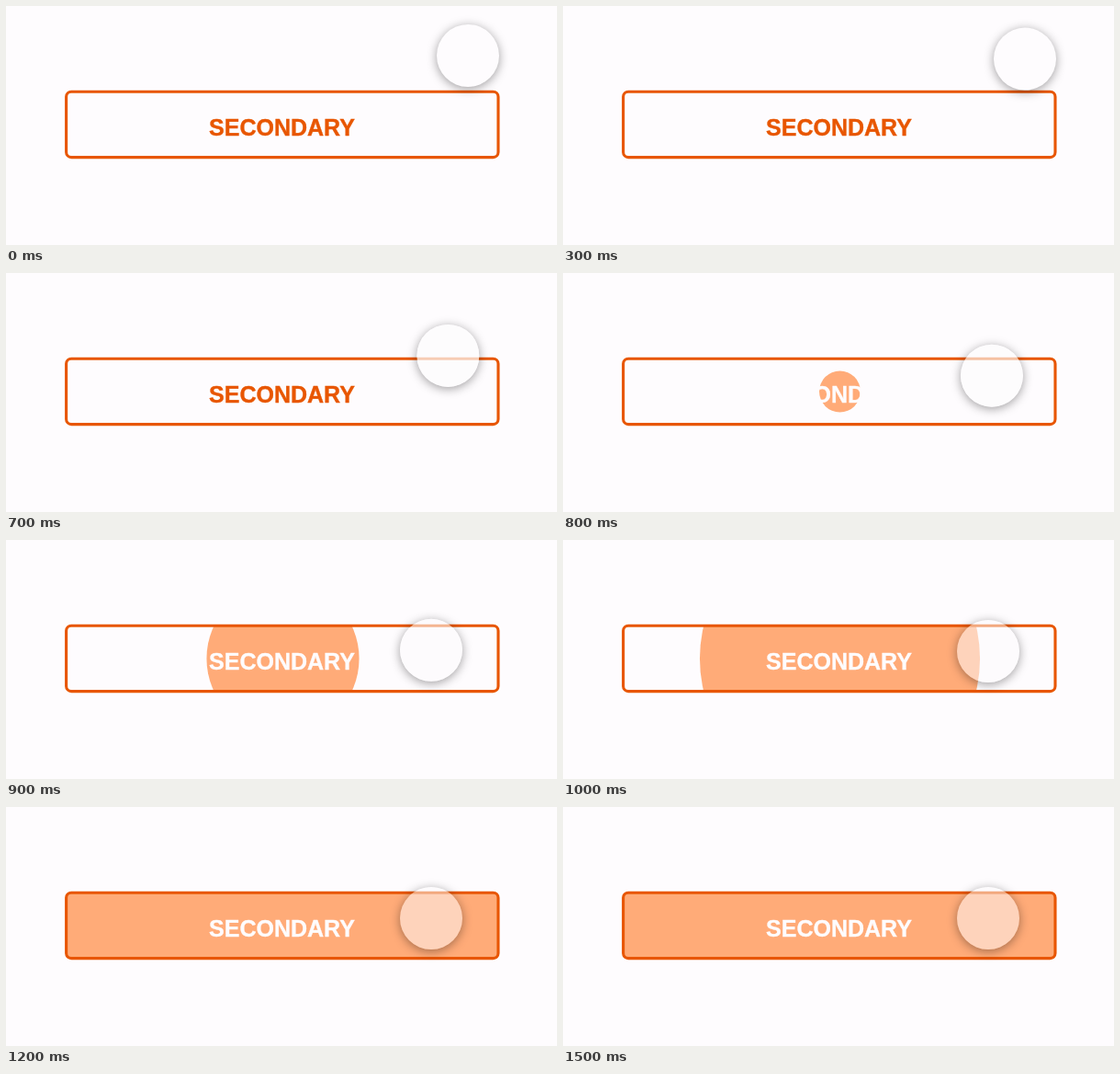
Write an HTML page that moves like this. It is 600 px wide and 260 px high and loops after 2 s.

```html
<!DOCTYPE html>
<html lang="en">
<head>
<meta charset="utf-8">
<title>Button ripple</title>
<style>
  html, body { margin: 0; width: 100%; height: 100%; overflow: hidden; background: #fefcfe; }
  svg { position: absolute; left: 0; top: 0; display: block; }
  text {
    font: bold 25px "Liberation Sans", Arial, sans-serif; text-anchor: middle;
    stroke: currentColor; stroke-width: .4; fill: currentColor;
  }
  #touch {
    position: absolute; left: -34px; top: -34px; width: 68px; height: 68px;
    border-radius: 50%; box-shadow: 0 2px 11px rgba(0, 0, 0, .38);
  }
</style>
</head>
<body>
<svg width="600" height="260" viewBox="0 0 600 260">
  <clipPath id="inside"><rect x="65.6" y="93.3" width="470.4" height="71.3" rx="5.5"/></clipPath>
  <circle id="ripple" cx="301.5" cy="129" r="0" fill="#ffab78" clip-path="url(#inside)"/>
  <rect x="65.6" y="93.3" width="470.4" height="71.3" rx="5.5" fill="none" stroke="#e85600" stroke-width="3.1"/>
  <text id="label" x="300.5" y="141">SECONDARY</text>
</svg>
<div id="touch"></div>
<script>
const LOOP = 2000, STEP = 100, PRESS = 750;
const ripple = document.getElementById('ripple');
const label = document.getElementById('label');
const touch = document.getElementById('touch');

const progress = (t, from, to) => Math.min(1, Math.max(0, (t - from) / (to - from)));
const smooth = p => p * p * (3 - 2 * p);

function draw(time) {
  const t = Math.floor((time % LOOP) / STEP) * STEP;

  // A slow drift down, then a quick move onto the button
  const x = 503 - 40 * smooth(progress(t, 510, 870));
  const y = 54 + 12 * progress(t, 0, 1000) + 55 * smooth(progress(t, 520, 880));
  const alpha = 1 - 0.5 * progress(t, 300, 1000);
  touch.style.transform = `translate(${x}px, ${y}px)`;
  touch.style.background = `rgba(254, 252, 254, ${alpha})`;

  // The ripple speeds up slightly until it fills the button
  ripple.setAttribute('r', 307 * progress(t, PRESS, 1200) ** 1.19);
  label.style.color = t < PRESS ? '#e85600' : '#fefcfe';
}

const start = performance.now();
function tick() {
  draw(performance.now() - start);
  requestAnimationFrame(tick);
}
tick();
</script>
</body>
</html>
```
